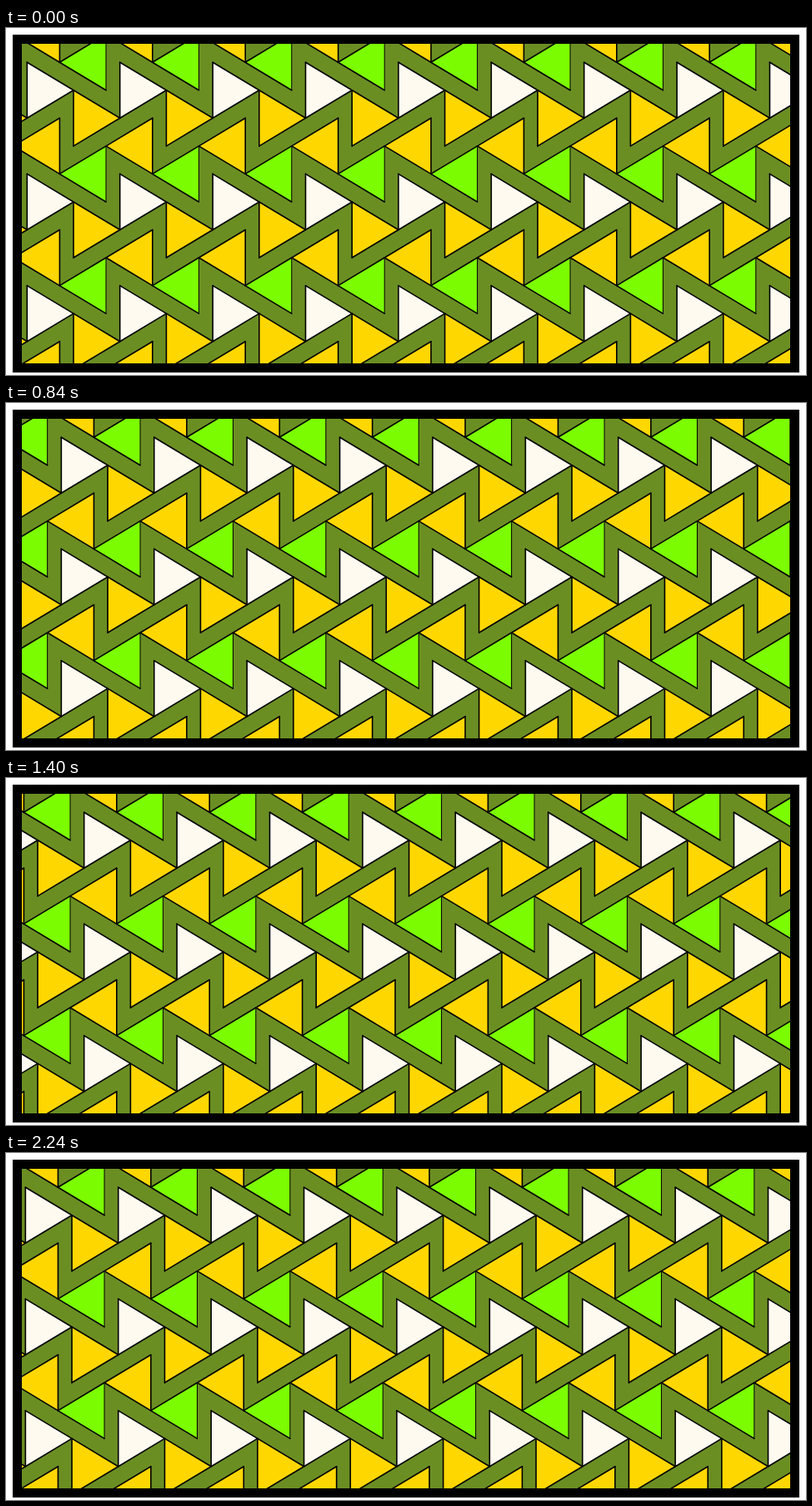
Animation of 960 by 417 pixels, one loop 2.28 s. Source, as an HTML page with a canvas:

```html
<!DOCTYPE html>
<html lang="en">
<head>
<meta charset="utf-8">
<title>Drifting triangles</title>
<style>
  html, body { margin: 0; width: 100%; height: 100%; overflow: hidden; background: #fff; }
  canvas { display: block; }
</style>
</head>
<body>
<canvas id="stage" width="960" height="417"></canvas>
<script>
const ctx = document.getElementById('stage').getContext('2d');
const LOOP = 2280, STEP = 40;
const W = 55.7, H = 33.55;            // triangle width and half its height
const TILE_X = 2 * W, TILE_Y = 4 * H;
const LEFT = 25.3, TOP = 41.2;

// x and y of the upright side's top, pointing direction, colour, upright line weight
const triangles = [
  [0, 0, 1, '#fffaf0', 1.6],
  [W, H, 1, '#ffd700', 1.6],
  [39.1, 2 * H, -1, '#ffd700', 1.6],
  [94.7, 3 * H, -1, '#7cfc00', 1]
];

function triangle(x, y, dir, color, upright) {
  ctx.beginPath();
  ctx.moveTo(x, y);
  ctx.lineTo(x + dir * W, y + H);
  ctx.lineTo(x, y + 2 * H);
  ctx.fillStyle = color;
  ctx.fill();
  ctx.lineWidth = 1.6;
  ctx.stroke();
  ctx.beginPath();
  ctx.moveTo(x, y);
  ctx.lineTo(x, y + 2 * H);
  ctx.lineWidth = upright;
  ctx.stroke();
}

function draw(time) {
  const shift = Math.floor((time % LOOP) / STEP) * STEP / LOOP * TILE_X;
  ctx.fillStyle = '#fff';
  ctx.fillRect(0, 0, 960, 417);
  ctx.fillStyle = '#000';
  ctx.fillRect(8, 8, 944, 406);

  ctx.save();
  ctx.beginPath();
  ctx.rect(19, 19, 922, 384);
  ctx.clip();
  ctx.fillStyle = '#6b8e23';
  ctx.fillRect(19, 19, 922, 384);
  ctx.strokeStyle = '#000';
  ctx.lineJoin = ctx.lineCap = 'round';
  for (let row = -1; row < 3; row++)
    for (let col = -2; col < 9; col++)
      for (const [x, y, ...look] of triangles)
        triangle(LEFT + shift + col * TILE_X + x, TOP + row * TILE_Y + y, ...look);
  ctx.restore();
}

const start = performance.now();
function tick() {
  draw(performance.now() - start);
  requestAnimationFrame(tick);
}
tick();
</script>
</body>
</html>
```
